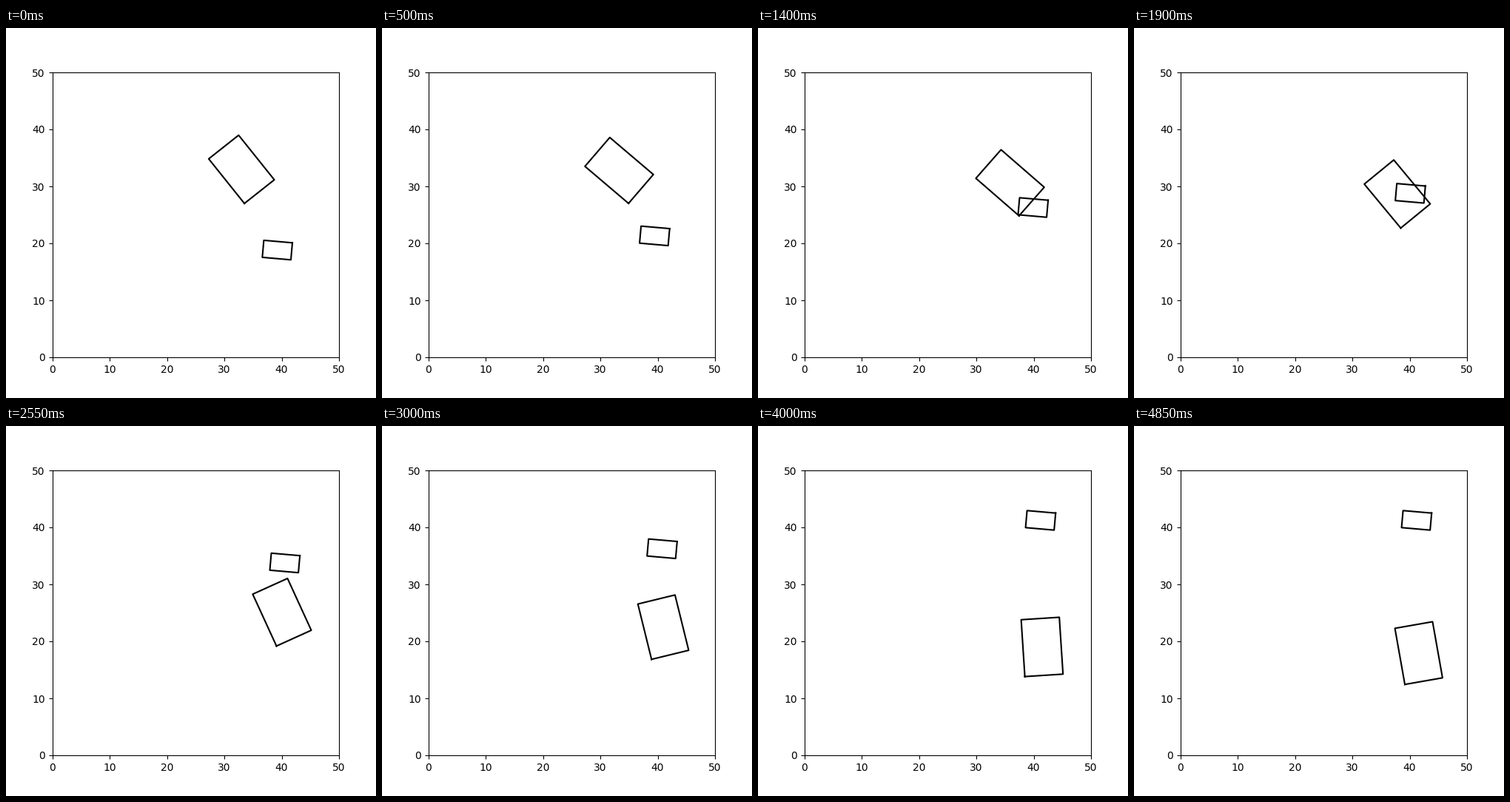
Animation of 500x500 px, one loop 8000 ms. Source, as a matplotlib script:

```python
import numpy as np
import matplotlib.pyplot as plt
from matplotlib.animation import FuncAnimation

TICK = 50       # ms per drawn frame
LOOP = 8000     # ms

# The big box takes three uneven steps per beat, the small one steps steadily.
BEAT = 492
big_times = np.add.outer(BEAT * np.arange(11) - 116, [0, 132, 325]).ravel()[1:31]
small_times = 40 + 480 * np.arange(9)

# Key poses of the big box: step, x, y, heading in degrees.
KEYS = np.array([
    (0, 33.00, 32.99, -51.5),
    (6, 34.19, 32.01, -36.7),
    (12, 37.84, 28.66, -50.5),
    (16, 40.06, 25.11, -65.5),
    (19, 40.98, 22.49, -76.2),
    (25, 41.47, 19.02, -86.3),
    (30, 41.58, 17.94, -80.0),
])
KNOTS, POSES = KEYS[:, 0], KEYS[:, 1:]
SLOPES = np.gradient(POSES, KNOTS, axis=0, edge_order=2)


def big_pose(step):
    """Cubic Hermite curve through the key poses."""
    i = min(np.searchsorted(KNOTS, step, side="right") - 1, len(KNOTS) - 2)
    h = KNOTS[i + 1] - KNOTS[i]
    u = (step - KNOTS[i]) / h
    return ((1 + 2 * u) * (1 - u) ** 2 * POSES[i]
            + u * (1 - u) ** 2 * h * SLOPES[i]
            + u * u * (3 - 2 * u) * POSES[i + 1]
            + u * u * (u - 1) * h * SLOPES[i + 1])


def small_pose(step):
    """Straight drive along a fixed heading."""
    heading = 85
    a = np.radians(heading)
    dist = 2.5 * step
    return 39.25 + dist * np.cos(a), 18.82 + dist * np.sin(a), heading


def outline(pose, length, width):
    x, y, heading = pose
    a = np.radians(heading)
    along = np.array([1, 1, -1, -1, 1]) * length / 2
    across = np.array([-1, 1, 1, -1, -1]) * width / 2
    return (x + along * np.cos(a) - across * np.sin(a),
            y + along * np.sin(a) + across * np.cos(a))


def steps_done(times, t):
    return np.searchsorted(times, t, side="right")


fig, ax = plt.subplots(figsize=(5, 5), dpi=100)
ax.set_xlim(0, 50)
ax.set_ylim(0, 50)
ax.set_xticks(range(0, 51, 10))
ax.set_yticks(range(0, 51, 10))
big, = ax.plot([], [], color="black", lw=1.5)
small, = ax.plot([], [], color="black", lw=1.5)


def draw(frame):
    t = frame * TICK
    big.set_data(*outline(big_pose(steps_done(big_times, t)), 10, 20 / 3))
    small.set_data(*outline(small_pose(steps_done(small_times, t)), 3, 5))
    return big, small


anim = FuncAnimation(fig, draw, frames=LOOP // TICK, interval=TICK,
                     repeat=True, repeat_delay=0)
plt.show()
```
